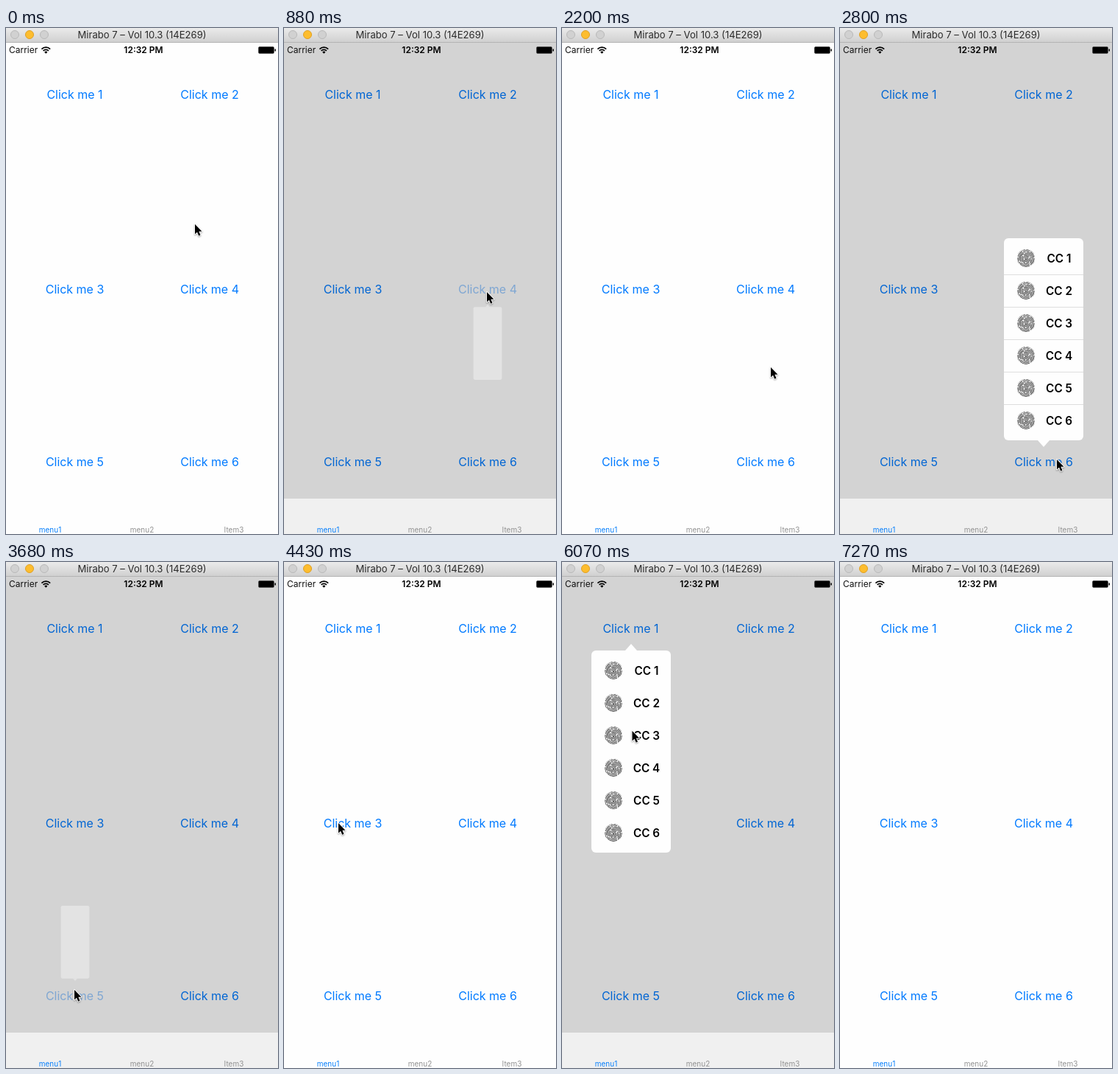
Animation, 370 px wide and 686 px high, one loop 7.56 s. Source, as an HTML page with a canvas:

```html
<!DOCTYPE html>
<html lang="en">
<head>
<meta charset="utf-8">
<title>Popover menu demo</title>
<style>
  html, body { margin: 0; width: 100%; height: 100%; overflow: hidden; background: #fefefe; }
  canvas { display: block; width: 370px; height: 686px; }
</style>
</head>
<body>
<canvas id="stage"></canvas>
<script>
const W = 370, H = 686, LOOP = 7560;
const canvas = document.getElementById('stage');
const ctx = canvas.getContext('2d');
const ratio = window.devicePixelRatio || 1;
canvas.width = W * ratio;
canvas.height = H * ratio;

const FONT = 'Inter, Roboto, sans-serif';
const COLUMNS = [93.5, 277], ROWS = [90, 354, 588];
const MENU = { width: 108, height: 274, row: 44, pad: 5, tip: 9, gap: 20.3 };

// Pointer tip: time, x, y
const POINTER = [
  [0, 257, 266], [140, 260, 285], [290, 270, 330], [440, 276, 358],
  [1910, 278, 380], [2060, 284, 460], [2210, 292, 555], [2350, 295, 585],
  [3250, 262, 588], [3400, 150, 584], [3530, 93, 580],
  [3830, 86, 470], [3980, 74, 354],
  [5470, 80, 250], [5620, 94, 92], [6070, 95.5, 229], [6220, 95, 244],
  [6520, 140, 345], [6670, 206, 513], [6970, 242, 569], [7120, 295, 668], [7270, 300, 720]
];

// Menu phases: time, phase, button number
const PHASES = [
  [0, 'idle', 0],
  [730, 'press', 4], [880, 'grow', 4], [1030, 'open', 4], [1180, 'ruled', 4], [1470, 'close', 4], [1620, 'idle', 0],
  [2350, 'press', 6], [2500, 'grow', 6], [2650, 'open', 6], [2800, 'ruled', 6], [3100, 'close', 6], [3250, 'idle', 0],
  [3530, 'press', 5], [3680, 'grow', 5], [3830, 'open', 5], [3980, 'ruled', 5], [4280, 'close', 5], [4430, 'idle', 0],
  [4580, 'press', 3], [4730, 'grow', 3], [4870, 'open', 3], [5020, 'ruled', 3], [5170, 'close', 3], [5320, 'idle', 0],
  [5770, 'press', 1], [5920, 'grow', 1], [6070, 'open', 1], [6220, 'close', 1], [6370, 'idle', 0]
];

const latest = (steps, t) => steps.findLast(step => step[0] <= t);
const buttonCenter = n => [COLUMNS[(n - 1) % 2], ROWS[Math.floor((n - 1) / 2)]];

function label(text, x, y, size, color, weight = 400, align = 'center') {
  ctx.font = `${weight} ${size}px ${FONT}`;
  ctx.textAlign = align;
  ctx.fillStyle = color;
  ctx.fillText(text, x, Math.round(y + size * 0.364));
}

function rect(x, y, w, h, fill) {
  ctx.fillStyle = fill;
  ctx.fillRect(x, y, w, h);
}

function polygon(points) {
  ctx.beginPath();
  points.forEach(([x, y]) => ctx.lineTo(x, y));
  ctx.closePath();
}

function drawTitleBar() {
  const shade = ctx.createLinearGradient(0, 0, 0, 19);
  shade.addColorStop(0, '#ebebeb');
  shade.addColorStop(1, '#d0d0d0');
  rect(0, 0, W, 19, shade);
  rect(0, 19, W, 1, '#b4b4b4');
  [['#d1d1d1', '#b9b9b9'], ['#fdbd2e', '#dfa023'], ['#d1d1d1', '#b9b9b9']].forEach(([fill, line], i) => {
    ctx.beginPath();
    ctx.arc(12 + 20 * i, 9, 5.5, 0, Math.PI * 2);
    ctx.fillStyle = fill;
    ctx.fill();
    ctx.strokeStyle = line;
    ctx.lineWidth = 1;
    ctx.stroke();
  });
  label('Mirabo 7 – Vol 10.3 (14E269)', 185, 9.5, 13.1, '#2b2b2b');
}

function drawStatusBar() {
  label('Carrier', 4, 30, 12, '#111', 400, 'left');
  label('12:32 PM', 187, 30, 12, '#000', 600);
  ctx.strokeStyle = ctx.fillStyle = '#000';
  ctx.lineWidth = 1.7;
  for (const r of [5.2, 8.3]) {
    ctx.beginPath();
    ctx.arc(54.3, 34.5, r, -Math.PI * 0.75, -Math.PI * 0.25);
    ctx.stroke();
  }
  ctx.beginPath();
  ctx.moveTo(54.3, 34.8);
  ctx.arc(54.3, 34.8, 3, -Math.PI * 0.75, -Math.PI * 0.25);
  ctx.fill();
  ctx.lineWidth = 1;
  ctx.strokeStyle = '#555';
  ctx.beginPath();
  ctx.roundRect(343.5, 25.5, 21, 9, 1.5);
  ctx.stroke();
  rect(344, 26, 20, 8, '#000');
  rect(365.5, 28.5, 1.5, 3, '#000');
}

function drawTabs(dimmed) {
  if (dimmed) rect(0, 638, W, H - 638, '#f0f0f0');
  label('menu1', 60, 680, 10, '#0a80fb');
  label('menu2', 185, 680, 10, '#929292');
  label('Item3', 310, 680, 10, '#929292');
}

function drawButtons(phase, active, dimmed) {
  for (let n = 1; n <= 6; n++) {
    const [x, y] = buttonCenter(n);
    const held = n === active && (phase === 'press' || phase === 'grow');
    ctx.globalAlpha = held ? (phase === 'press' ? 0.25 : 0.4) : 1;
    label('Click me ' + n, x, y, 16, dimmed ? '#0065d3' : '#007aff');
  }
  ctx.globalAlpha = 1;
}

function drawFingerprint(x, y) {
  ctx.save();
  ctx.translate(x, y);
  ctx.beginPath();
  ctx.arc(0, 0, 12, 0, Math.PI * 2);
  ctx.clip();
  ctx.strokeStyle = '#505050';
  ctx.lineWidth = 1.1;
  for (let k = 0; k < 9; k++) {
    ctx.setLineDash([9 + k % 3 * 4, 1.2]);
    ctx.lineDashOffset = k * 5.3;
    ctx.beginPath();
    ctx.ellipse(0, 1.5, 0.7 + k * 1.75, 1 + k * 1.8, 0, 0, Math.PI * 2);
    ctx.stroke();
  }
  ctx.restore();
}

function drawMenu(phase, n) {
  const [x, y] = buttonCenter(n);
  const below = n < 5;
  const side = below ? 1 : -1;
  const scale = phase === 'grow' ? 0.36 : 1;
  const top = below ? MENU.tip : -MENU.tip - MENU.height;
  const left = -MENU.width / 2;

  ctx.save();
  ctx.translate(Math.round(x), Math.ceil(y + side * MENU.gap));
  ctx.scale(scale, scale);
  ctx.globalAlpha = phase === 'grow' ? 0.35 : 1;
  ctx.fillStyle = '#fefefe';
  ctx.beginPath();
  ctx.roundRect(left, top, MENU.width, MENU.height, 6);
  ctx.fill();
  polygon([[0, 0], [8, side * MENU.tip], [-8, side * MENU.tip]]);
  ctx.fill();

  if (phase !== 'grow') {
    for (let i = 0; i < 6; i++) {
      const rowTop = top + MENU.pad + i * MENU.row;
      const middle = rowTop + MENU.row / 2;
      drawFingerprint(left + 30, middle);
      label('CC ' + (i + 1), left + 75, middle, 15.3, '#000', 600);
      if (phase === 'ruled' && i) rect(left, rowTop, MENU.width, 1, '#dedede');
    }
  }
  ctx.restore();
}

function drawPointer(x, y) {
  ctx.save();
  ctx.translate(x, y);
  ctx.scale(0.95, 0.95);
  polygon([[0, 0], [0, 14.2], [3.2, 11.3], [5.5, 16.5], [7.9, 15.4], [5.7, 10.3], [10, 10.2]]);
  ctx.lineJoin = 'round';
  ctx.lineWidth = 2;
  ctx.strokeStyle = '#fff';
  ctx.shadowColor = 'rgba(0, 0, 0, 0.35)';
  ctx.shadowBlur = 2 * ratio;
  ctx.shadowOffsetY = ratio;
  ctx.stroke();
  ctx.shadowColor = 'transparent';
  ctx.fillStyle = '#000';
  ctx.fill();
  ctx.restore();
}

function draw(t) {
  const [, phase, active] = latest(PHASES, t);
  const [, x, y] = latest(POINTER, t);
  const dimmed = phase !== 'idle' && phase !== 'press';
  ctx.setTransform(ratio, 0, 0, ratio, 0, 0);
  rect(0, 0, W, H, dimmed ? '#d3d3d3' : '#fefefe');
  drawTitleBar();
  drawStatusBar();
  drawButtons(phase, active, dimmed);
  drawTabs(dimmed);
  if (dimmed && phase !== 'close') drawMenu(phase, active);
  drawPointer(x, y);
}

const start = performance.now();
function tick() {
  draw((performance.now() - start) % LOOP);
  requestAnimationFrame(tick);
}
tick();
</script>
</body>
</html>
```
